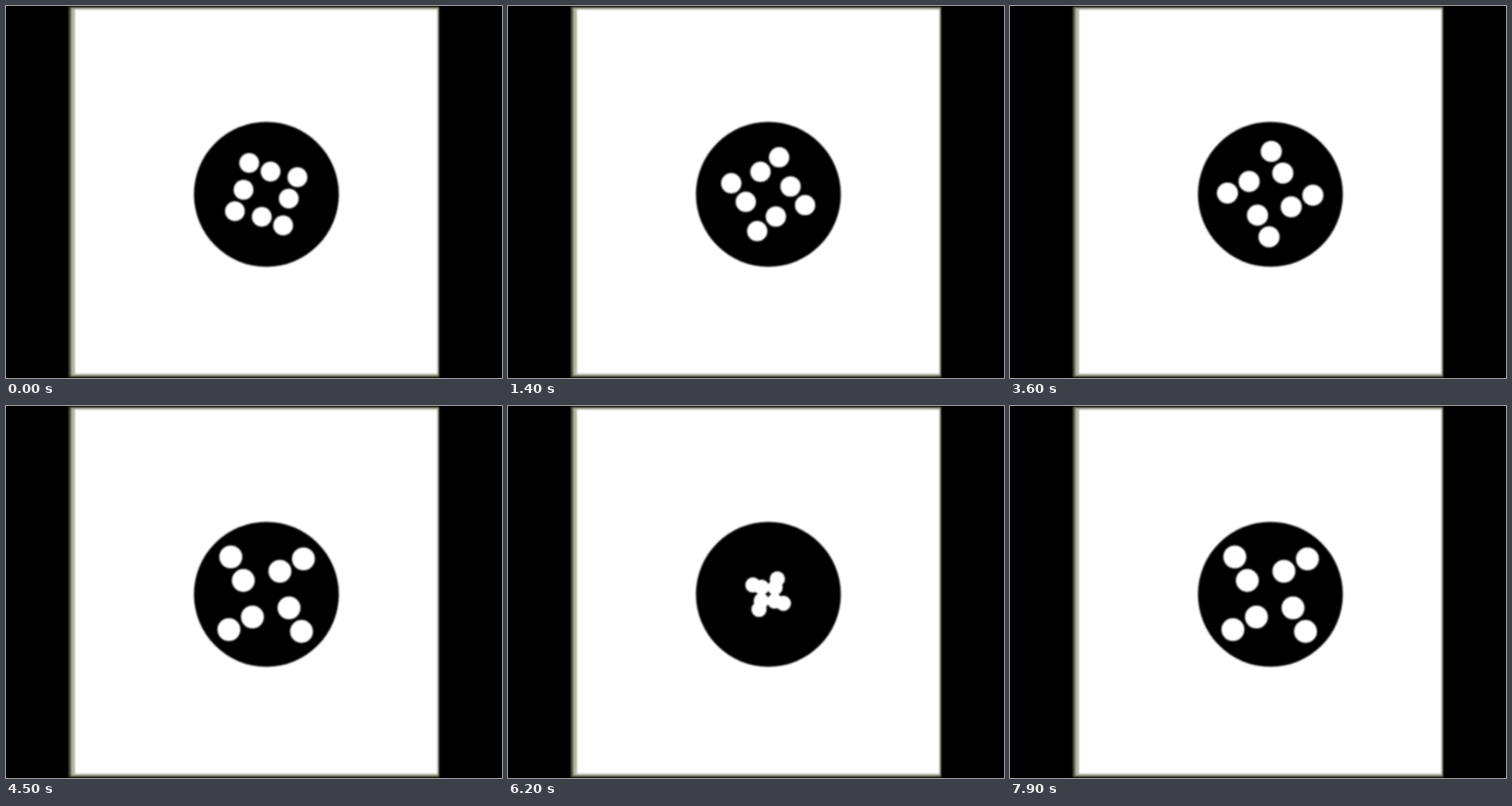
These frames come from a looping animation (640x480 px, 8 s). An HTML page with a canvas:

```html
<!DOCTYPE html>
<html lang="en">
<head>
<meta charset="utf-8">
<title>Folding dots</title>
<style>
  html, body { margin: 0; width: 100%; height: 100%; overflow: hidden; background: #000; }
  canvas { display: block; filter: blur(1.1px); }
</style>
</head>
<body>
<canvas id="stage" width="640" height="480"></canvas>
<script>
  const ctx = document.getElementById('stage').getContext('2d');
  const STEP = 100, STEPS = 80, TAU = Math.PI * 2;
  const CX = 335.7, CY = 242.8;

  function box(color, left, top, right, bottom) {
    ctx.fillStyle = color;
    ctx.fillRect(left, top, right - left, bottom - top);
  }

  function dot(color, x, y, r) {
    ctx.fillStyle = color;
    ctx.beginPath();
    ctx.arc(x, y, r, 0, TAU);
    ctx.fill();
  }

  // Ten degrees per step, with one extra turn of ten every twenty steps.
  function foldAngle(n) {
    return -79 + 10 * (n + Math.floor((n + 6) / 20));
  }

  // The arms shrink as they fold up and grow as they open.
  function armLength(angle) {
    const turn = ((angle % 360) + 360) % 360;
    return 37.4 - 0.097 * Math.min(turn, 360 - turn);
  }

  function drawPanel() {
    box('#000', 0, 0, 640, 480);
    box('#55553f', 81, 1, 559, 479);
    box('#b4b4a6', 84, 2.5, 558, 477);
    box('#fff', 89, 4.5, 556.5, 474.5);
    dot('#000', 336, 243, 93.5);
  }

  function drawArms(n) {
    const fold = foldAngle(n);
    const len = armLength(fold);
    const theta = fold * Math.PI / 180;
    for (let i = 0; i < 4; i++) {
      const inner = theta + i * TAU / 4;
      const outer = inner + theta;
      const x = CX + len * Math.cos(inner);
      const y = CY + len * Math.sin(inner);
      dot('#fff', x, y, len * 0.43);
      dot('#fff', x + len * Math.cos(outer), y + len * Math.sin(outer), len * 0.43);
    }
  }

  const start = performance.now();
  let shown = -1;

  function render() {
    const n = Math.floor((performance.now() - start) / STEP) % STEPS;
    if (n !== shown) {
      shown = n;
      drawPanel();
      drawArms(n);
    }
    requestAnimationFrame(render);
  }

  render();
</script>
</body>
</html>
```
